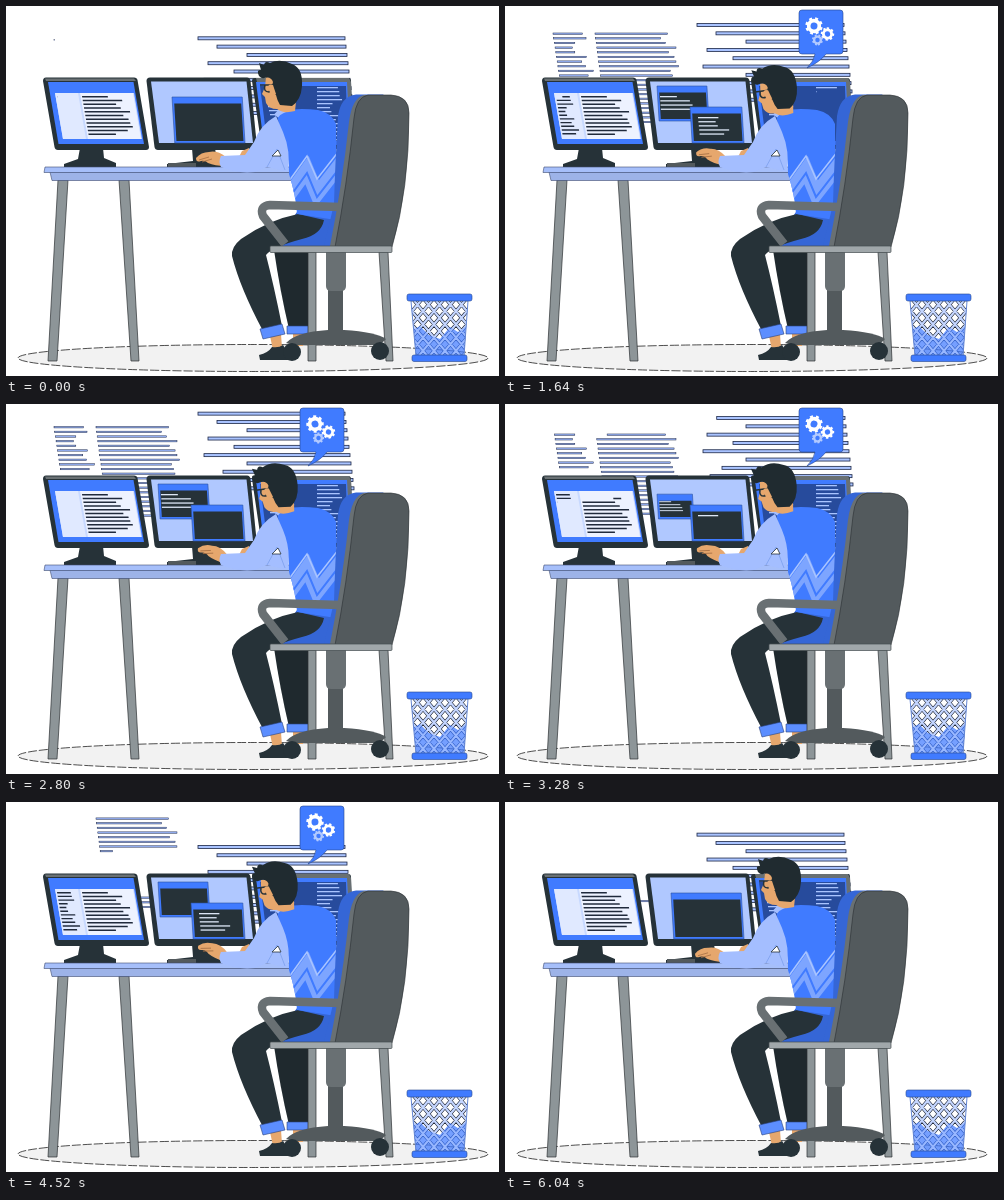
Animation of 493x370 px, one loop 6080 ms. Source, as an HTML page:

```html
<!DOCTYPE html>
<html lang="en">
<head>
<meta charset="utf-8">
<title>Programmer at work</title>
<style>
html, body { margin: 0; width: 100%; height: 100%; overflow: hidden; background: #fff; }
svg { display: block; width: 100vw; height: 100vh; }
.skin { fill: #e6a76d; }
.dark { fill: #263238; }
.blue { fill: #407bff; }
.pale { fill: #a4beff; }
.grey { fill: #697073; }
.slate { fill: #535a5d; }
.leg { fill: #8d9598; stroke: #2b3033; stroke-width: .7; }
.line { fill: none; }
</style>
</head>
<body>
<svg viewBox="0 0 493 370">
  <defs>
    <clipPath id="basket"><path d="M405 295H462L458 350H410Z"/></clipPath>
    <clipPath id="vestClip"><path id="vest" d="M271 106Q290 101 312 104Q326 107 330 118V214L291 208Q290 190 283 168Q284 150 275 136Z"/></clipPath>
  </defs>

  <ellipse cx="247" cy="352" rx="235" ry="13.5" fill="#f2f2f2" stroke="#222" stroke-width=".8" stroke-dasharray="9 2"/>

  <g id="codeFar"></g>

  <!-- right monitor -->
  <path class="dark" d="M249 72H342Q345 72 345 75L348 143H256L246 75Q246 72 249 72Z"/>
  <path class="grey" d="M250 72H343L345 76V120H341V76H251Z"/>
  <path class="blue" d="M250 76H341L344 139H258Z"/>
  <path d="M254 80H340L342 135H261Z" fill="#274b9c"/>
  <g id="codeRight"></g>

  <!-- middle monitor -->
  <path class="dark" d="M186 142H209L211 156L217 159V162H161V158L187 155Z"/>
  <path class="slate" d="M162 157H190V161H162Z"/>
  <path class="dark" d="M144 71.5H241Q244 71.5 244.5 75L251 141Q251 144 248 144H152Q149 144 148.5 141L140.5 75Q140.5 71.5 144 71.5Z"/>
  <path d="M145 75.5H240.5L247 137H153Z" fill="#b0c8ff"/>
  <g id="winA"></g>
  <g id="winB"></g>

  <!-- left monitor -->
  <path class="dark" d="M74 142H97L98 152L110 157V161H58V158L72 153Z"/>
  <path class="dark" d="M40 71.5H128Q131 71.5 131.5 74L143 141Q143 144 140 144H52Q49 144 48.5 141L37 75Q37 71.5 40 71.5Z"/>
  <path class="grey" d="M39 72.5H128L130 75H40Z"/>
  <path class="blue" d="M42 76H127.5L138 138H52.5Z"/>
  <path d="M49 87H128L136 133H57Z" fill="#c8d9ff"/>
  <path d="M49 87H72L80 133H57Z" fill="#e0e9ff"/>
  <path d="M74 87H127L135 133H82Z" fill="#edf2ff"/>
  <g id="codeLeft" transform="matrix(1 0 .17 1 -15.3 0)"></g>

  <!-- table -->
  <path class="leg" d="M52 174H62L51 355H42ZM113 174H123L133 355H125Z"/>
  <path d="M44 166H312V174.500H46Z" fill="#9db3e8" stroke="#3d4a70" stroke-width=".6"/>
  <path d="M39 161H290V166.500H38Z" fill="#a6bffa" stroke="#3d4a70" stroke-width=".6"/>

  <!-- seat, legs and feet -->
  <path d="M291 206L330 208V241H268Q267 233 274 230Z" fill="#3566d6"/>
  <path class="skin" d="M287 327H297V340H287ZM264 330L275 328L276 342L267 344Z"/>
  <path d="M268 244H302L303 322L283 323Q274 285 268 244Z" fill="#1f292e"/>
  <path class="dark" d="M292 208L318 214Q315 229 296 233Q266 241 260 249Q268 280 276 320L257 325Q234 282 226 250Q225 241 235 233Q262 214 292 208Z"/>
  <path d="M254 323L276 318L279 328L257 333ZM281 320H303V328H281Z" fill="#5c8eff" stroke="#27417f" stroke-width=".6"/>
  <path class="dark" d="M253 349Q262 347 266 341Q273 342 277 339L283 348L288 354H254Z"/>

  <!-- torso -->
  <path class="skin" d="M236 145L243 142L245 149L233 151Z"/>
  <use href="#vest" class="blue"/>
  <g clip-path="url(#vestClip)" class="line">
    <path d="M278 196L301 164L311 188L336 156" stroke="#7da5ff" stroke-width="14"/>
    <path d="M278 199L301 167L311 191L336 159" stroke="#407bff" stroke-width="2"/>
    <path d="M278 182L301 150L311 173L336 141" stroke="#a9c4ff" stroke-width="1.500"/>
  </g>
  <g id="hand">
    <path class="skin" d="M220 151Q211 144 203 146Q195 146 190 152Q190 157 195 155Q199 154 202 157Q209 160 219 160Z"/>
    <path class="line" d="M193 154L203 151M196 156L206 153" stroke="#a56f45" stroke-width=".8"/>
  </g>
  <path class="pale" d="M270 110Q254 119 248 136L239 149L215 150Q212 156 215 161Q231 168 249 166L261 161L282 166Q285 145 277 126Z"/>
  <path class="line" d="M261 161L271 143L279 164" stroke="#7b9fec" stroke-width=".8"/>
  <path d="M266 150L272 144L275 150Z" fill="#fff" stroke="#263238" stroke-width=".8"/>
  <path class="line" d="M270 110Q274 104 286 102" stroke="#a4beff" stroke-width="5"/>

  <g id="head">
    <path class="skin" d="M260 71L277 73L290 96L289 105Q277 108 271 103Q263 103 260 97L259 91L256 88L259 81Z"/>
    <path class="line" d="M254 79H267M259 79Q257 86 263 86L266 80" stroke="#263238" stroke-width="1.500"/>
    <path d="M253 70Q250 63 255 64L253 57L258 59Q259 54 264 57Q274 52 286 58Q297 62 296 80Q295 94 286 100L274 99Q271 94 270 89Q264 84 267 76Q265 70 258 72Q256 73 253 70Z" fill="#202b30"/>
    <path class="skin" d="M267 79Q262 77 262 82Q264 89 270 88Z"/>
  </g>

  <!-- chair -->
  <path class="leg" d="M302 246H310V355H302ZM373 246H382L387 355H380Z"/>
  <path class="slate" d="M322 283H337V328H322Z"/>
  <path class="grey" d="M320 246H340V280Q340 285 335 285H325Q320 285 320 280Z"/>
  <path class="slate" d="M280 337Q290 326 322 324H338Q370 326 380 333L374 339H288Z"/>
  <circle class="dark" cx="286" cy="346" r="9"/>
  <circle class="dark" cx="374" cy="345" r="9"/>
  <path d="M378 88.500H350Q335 90 332 110Q329 160 328 198L318 240H340L356 98Z" fill="#3566d6"/>
  <path class="grey" d="M380 89H358Q346 92 343 116Q336 180 324 240H345L362 98Z"/>
  <path class="slate" d="M362 89H385Q403 90 403 107Q403 184 386 241H329Q341 180 348 112Q350 91 362 89Z" stroke="#2b3033" stroke-width=".6"/>
  <path class="line" d="M335 201L264 199Q253 200 257 210L279 238" stroke="#697073" stroke-width="8.500" stroke-linejoin="round"/>
  <rect x="264" y="240" width="122" height="6.500" rx="1" fill="#a0a7aa" stroke="#444c50" stroke-width=".7"/>

  <!-- waste basket -->
  <g clip-path="url(#basket)" class="line">
    <path id="meshDark" stroke="#222a3c" stroke-width="3.400"/>
    <path id="meshLight" stroke="#d5e1ff" stroke-width="2"/>
    <path class="blue" d="M405 325L414 320L423 329L434 333L444 321L452 326L463 318V352H405Z" fill-opacity=".72"/>
    <path id="meshLow" stroke="#b8ceff" stroke-opacity=".6" stroke-width="2"/>
  </g>
  <path d="M405 295L410 350M462 295L458 350" stroke="#6386d4"/>
  <g class="blue" stroke="#26478f" stroke-width=".6">
    <rect x="401" y="288" width="65" height="7" rx="2"/>
    <rect x="406" y="349" width="55" height="6.500" rx="2"/>
  </g>

  <g id="bubble">
    <path class="blue" d="M297 4H335Q338 4 338 7V45Q338 48 335 48H321Q315 56 302 62Q309 55 310 48H297Q294 48 294 45V7Q294 4 297 4Z" stroke="#26478f" stroke-width=".6"/>
    <g id="gears"></g>
  </g>
</svg>
<script>
const LOOP = 6080;
const $ = id => document.getElementById(id);
const clamp = v => Math.max(0, Math.min(1, v));
const smooth = v => (v = clamp(v), v * v * (3 - 2 * v));
const random = seed => Math.abs(Math.sin(seed * 12.9 + 1.7) * 43.7) % 1;

// Eases from 0 to 1 at `on` and back at `off`.
const hold = (t, on, off, span) => smooth((t - on) / span) - smooth((t - off) / span);

function add(parent, tag, attrs) {
  const node = document.createElementNS('http://www.w3.org/2000/svg', tag);
  for (const key in attrs) node.setAttribute(key, attrs[key]);
  return parent.appendChild(node);
}

// Seeded rows of text: `lean` shifts each start, lengths vary within `spread`.
const makeRows = (count, x, lean, min, spread, seed) =>
  Array.from({ length: count }, (_, i) => {
    const start = x + i * lean;
    return [start, start + min + random(i + seed) * spread];
  });

// Types rows at one pace and later erases them at the same pace.
// Each pass is [start of typing, start of erasing].
function codeBlock(parent, rows, top, gap, style, pace, passes) {
  const group = add(parent, 'g', style);
  const bars = rows.map((_, i) => add(group, 'rect', { y: top + i * gap, height: style.height }));
  return (t, transform = '') => {
    const [typeAt, eraseAt] = passes.filter(p => p[0] <= t).pop() || [LOOP, LOOP];
    group.setAttribute('transform', transform);
    bars.forEach((bar, i) => {
      const typed = clamp((t - typeAt) / pace - i);
      const erased = clamp((t - eraseAt) / pace - i);
      const [x1, x2] = rows[i];
      bar.setAttribute('x', x1 + (x2 - x1) * erased);
      bar.setAttribute('width', (x2 - x1) * Math.max(0, typed - erased));
      bar.setAttribute('display', typed > erased ? '' : 'none');
    });
  };
}

const wide = { fill: '#a9c3ff', stroke: '#1c2747', 'stroke-width': .8, height: 3 };
const thin = { fill: '#9db9ff', stroke: '#1c2747', 'stroke-width': .5, height: 1.4 };
const ink = { fill: '#202a3c', height: 1.4 };
const paleInk = { fill: '#dce6f5', height: 1.3 };
const blueInk = { fill: '#a9c4ff', height: 1.3 };
const ALWAYS = -LOOP;

// Background code
const far = $('codeFar');
const wideRows = [192, 211, 241, 202, 228, 198, 241, 217, 205, 220].map((x, i) => [x, 339 + i]);
const wideBlocks = [
  codeBlock(far, wideRows.slice(0, 4), -1.5, 8.3, wide, 180, [[ALWAYS, 150], [780, 3100], [3700, LOOP]]),
  codeBlock(far, wideRows.slice(4), 31.7, 8.3, wide, 50, [[ALWAYS, 3400], [3700, LOOP]])
];
const thinBlocks = [
  codeBlock(far, makeRows(10, 48, .7, 16, 20, 4), -.7, 4.65, thin, 110, [[0, 3060]]),
  codeBlock(far, makeRows(8, 90, .6, 53, 28, 9), -.7, 4.65, thin, 70, [[785, 3130], [4020, 5450]]),
  codeBlock(far, makeRows(12, 95, .6, 58, 22, 2), 36.5, 4.65, thin, 70, [[200, 3900], [4740, 5240]])
];

// Code on the side monitors
const screenBlocks = [
  codeBlock($('codeLeft'), makeRows(11, 51, 0, 6, 12, 3), 90, 3.7, ink, 90, [[0, 1600], [3100, 4720]]),
  codeBlock($('codeLeft'), makeRows(11, 76, 0, 22, 25, 8), 90, 3.75, ink, 45,
    [[ALWAYS, 50], [550, 3200], [3800, LOOP]]),
  codeBlock($('codeRight'), makeRows(14, 311, 0, 12, 16, 2), 81, 4, blueInk, 40, [[ALWAYS, 1000], [1600, LOOP]]),
  codeBlock($('codeRight'), makeRows(7, 258, 1, 8, 26, 5), 84, 4, blueInk, 40, [[ALWAYS, LOOP]])
];

// Editor windows on the middle monitor
function editor(id) {
  const frame = add($(id), 'path', { fill: '#407bff', stroke: '#2b519f', 'stroke-width': .6 });
  const pane = add($(id), 'path', { fill: '#263238' });
  const quad = (x1, y1, x2, y2) => {
    const lean = (y2 - y1) * .06;
    return `M${x1} ${y1}H${x2 - lean}L${x2} ${y2}H${x1 + lean}Z`;
  };
  return (x1, y1, x2, y2) => {
    frame.setAttribute('d', quad(x1, y1, x2, y2));
    pane.setAttribute('d', quad(x1 + 2.2, y1 + 6.5, x2 - 1.5, y2 - 2));
    $(id).setAttribute('display', x2 - x1 < 5 ? 'none' : '');
  };
}
const windowA = editor('winA'), windowB = editor('winB');
const codeA = codeBlock($('winA'), makeRows(4, 155, .3, 14, 28, 1), 90, 4.2, paleInk, 60, [[800, 3500], [4700, 5500]]);
const codeB = codeBlock($('winB'), makeRows(5, 193, .4, 16, 20, 6), 111, 4.1, paleInk, 193, [[200, 1700], [3090, 4840]]);

// Gears and basket mesh
function gear(x, y, r, color, direction) {
  const g = add($('gears'), 'g', { class: 'line', stroke: color });
  add(g, 'circle', { r: r * .72, 'stroke-width': r * .5 });
  add(g, 'circle', { r, 'stroke-width': r * .36, 'stroke-dasharray': Math.PI * r / 8 });
  return angle => g.setAttribute('transform', `translate(${x} ${y}) rotate(${angle * direction})`);
}
const gears = [
  gear(309, 20, 7.4, '#fff', 1),
  gear(322.5, 28, 5.7, '#fff', -1),
  gear(312.5, 34, 4.7, '#b3caff', 1)
];

let mesh = '';
for (let x = 340; x < 525; x += 11) mesh += `M${x} 292l50 60M${x} 292l-50 60`;
for (const id of ['meshDark', 'meshLight', 'meshLow']) $(id).setAttribute('d', mesh);

function draw(t) {
  const wideY = 51.6 - (t + 2380) % LOOP * .0081;
  const thinY = 34 - t * .00385;
  wideBlocks.forEach(block => block(t, `translate(0 ${wideY})`));
  thinBlocks.forEach(block => block(t, `translate(0 ${thinY})`));
  screenBlocks.forEach(block => block(t));

  const sizeA = hold(t, 500, 5550, 300) - .29 * hold(t, 3000, 3500, 270);
  windowA(152, 115 - 35 * sizeA, 152 + 52 * sizeA, 115);
  codeA(t, `translate(152 115) scale(${sizeA}) translate(-152 -115)`);

  const shrink = hold(t, 500, 5000, 320);
  windowB(166 + 19 * shrink, 91 + 10 * shrink, 239, 137);
  codeB(t, `translate(${16 * (shrink - 1)} 0)`);

  const bow = hold(t, 1300, 4800, 400);
  $('head').setAttribute('transform', `translate(0 ${3 * bow}) rotate(${-8 * bow} 283 110)`);

  const lift = (1 - Math.cos(t / LOOP * 20 * Math.PI)) / 2;
  $('hand').setAttribute('transform', `rotate(${16 * lift} 222 156)`);

  const pop = hold(t, 400, 5750, 280);
  $('bubble').setAttribute('transform', `translate(303 62) scale(${pop}) translate(-303 -62)`);
  $('bubble').setAttribute('display', pop > 0 ? '' : 'none');
  gears.forEach(turn => turn(t / LOOP * 360));
}

const start = performance.now();
function tick(now) {
  draw(Math.max(0, now - start) % LOOP);
  requestAnimationFrame(tick);
}
draw(0);
requestAnimationFrame(tick);
</script>
</body>
</html>
```
